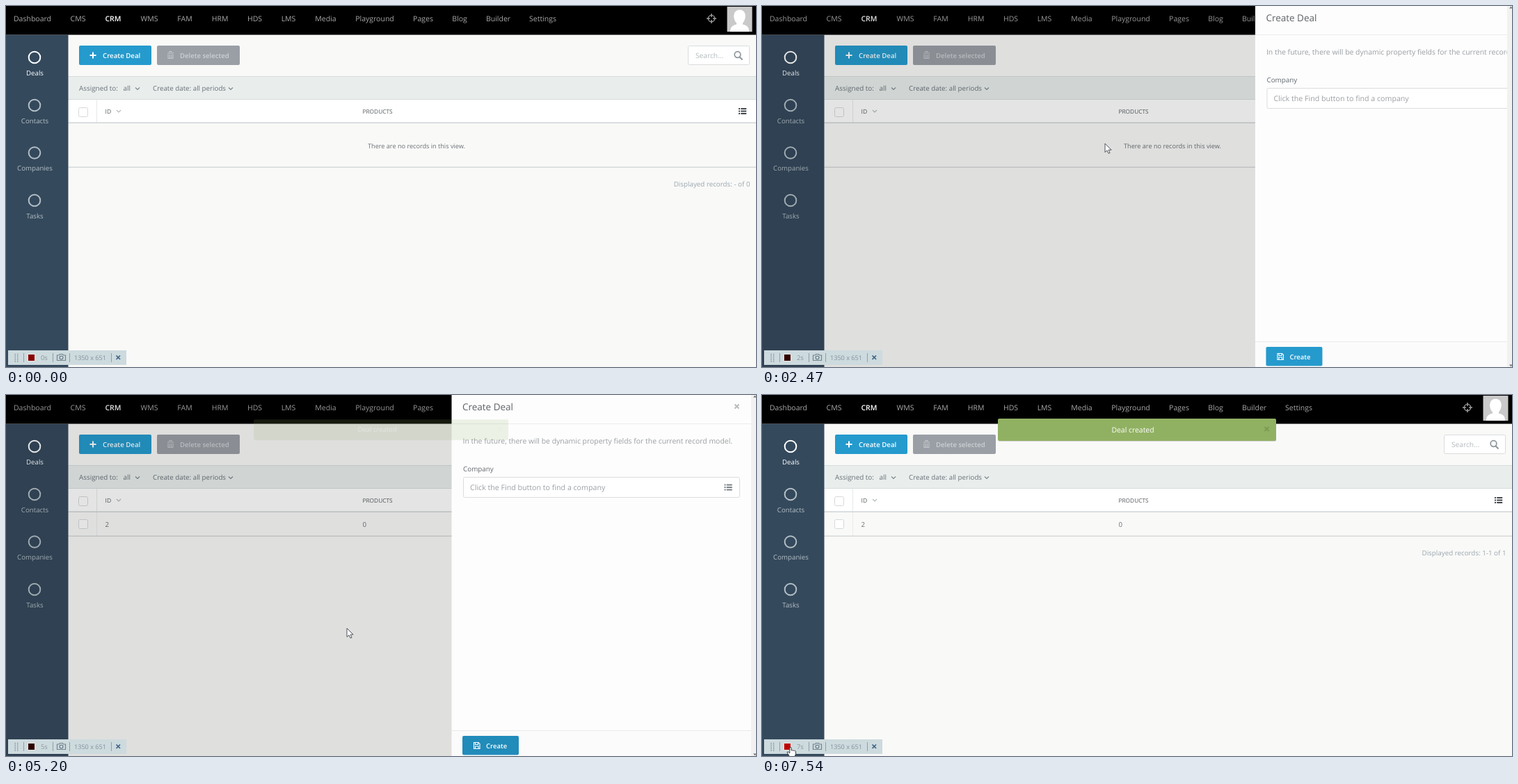
An HTML page for the animation above (7670 ms loop, 1078 px wide and 520 px high).

```html
<!DOCTYPE html>
<html lang="en">
<head>
<meta charset="utf-8">
<title>Create a deal</title>
<style>
  html, body { margin: 0; width: 100%; height: 100%; overflow: hidden; background: #f9f9f9; }
  svg { display: block; width: 1078px; height: 520px; text-rendering: geometricPrecision;
        font-family: "Open Sans", "Noto Sans", sans-serif; }
</style>
</head>
<body>
<svg id="stage" viewBox="0 0 1078 520"></svg>
<script>
const LOOP = 7670, STEP = 130, BLUE = '#259acd';

// ---- drawing helpers ----
const text = (x, y, str, size, fill, anchor = 'start', weight = 400, id = '') =>
  `<text x="${x}" y="${y}" font-size="${size}" fill="${fill}" text-anchor="${anchor}" font-weight="${weight}" id="${id}">${str}</text>`;
const rect = (x, y, w, h, fill, extra = '') =>
  `<rect x="${x}" y="${y}" width="${w}" height="${h}" fill="${fill}" ${extra}/>`;
const line = (d, color, width = 1) =>
  `<path d="${d}" fill="none" stroke="${color}" stroke-width="${width}"/>`;
const shape = (d, fill, extra = '') => `<path d="${d}" fill="${fill}" ${extra}/>`;
const ring = (x, y, r, color, width) =>
  `<circle cx="${x}" cy="${y}" r="${r}" fill="none" stroke="${color}" stroke-width="${width}"/>`;
const group = (id, body, extra = '') => `<g id="${id}" ${extra}>${body}</g>`;
const checkbox = y => rect(104.5, y, 13, 13, '#fff', 'rx="2" stroke="#d5d8da"');
const chevron = (x, y, color) => line(`M${x - 3} ${y - 1.5}l3 3 3-3`, color, 1.1);
const listIcon = (x, y, color) => [0, 3.5, 7].map(dy =>
  rect(x, y + dy, 2, 2, color) + rect(x + 3.2, y + dy, 8, 2, color)).join('');

// ---- page parts ----
function topBar() {
  const items = [['Dashboard', 38], ['CMS', 103.5], ['CRM', 154], ['WMS', 206], ['FAM', 257],
    ['HRM', 307.5], ['HDS', 357.5], ['LMS', 406], ['Media', 459.5], ['Playground', 530],
    ['Pages', 599.5], ['Blog', 652], ['Builder', 707.5], ['Settings', 771.5]];
  return rect(0, 0, 1078, 41.5, '#000') +
    items.map(([name, x]) => text(x, 21.7, name, 10.5, name === 'CRM' ? '#fff' : '#a9a9a9',
      'middle', name === 'CRM' ? 600 : 400)).join('') +
    ring(1014, 18, 4.7, '#a0a0a0', 1.3) +
    line('M1014 11v5M1014 20v5M1007 18h5M1016 18h5', '#a0a0a0', 1.5) +
    rect(1036.5, 1, 36, 36, '#c9c9c9') +
    shape('M1041 37c0-7 3-9 9-10.500v-2c-6-7-5-19 4.500-19s10.500 12 4.500 19v2c6 1.500 9 3.500 9 10.500z', '#fff');
}

function sideBar() {
  const items = [['Deals', 74], ['Contacts', 143], ['Companies', 211.5], ['Tasks', 280]];
  return rect(0, 41.5, 89.5, 478.5, '#34495c') + items.map(([name, y], i) => {
    const color = i ? '#b3bec6' : '#fff';
    return ring(41, y, 8.3, color, 2) + text(41.5, y + 25.8, name, 9.7, color, 'middle');
  }).join('');
}

function listView() {
  return rect(89.5, 41.5, 989, 479, '#f9f9f8') +
    rect(105, 57, 104, 28, BLUE, 'rx="2" id="createDeal"') +
    line('M120.500 71h9M125 66.500v9', '#fff', 2) +
    text(139, 74.8, 'Create Deal', 9.7, '#fff', 'start', 600) +
    rect(217, 57, 119, 28, '#9a9fa6', 'rx="2"') +
    line('M232 68h9M235 67v-1.500h3V67M233 69.500v6h7v-6M235.300 70v5M237.700 70v5', '#c3c7cb', 1.1) +
    text(250, 74.8, 'Delete selected', 9.55, '#cdd1d5', 'start', 600) +
    rect(980.5, 57.5, 88, 27, '#fff', 'rx="2" stroke="#d9dcdd"') +
    text(991, 75, 'Search...', 10.2, '#b4babd') +
    ring(1051.5, 70, 4.3, '#8d9599', 1.7) + line('M1054.500 73.500l4 4', '#8d9599', 2) +
    rect(89.5, 101, 989, 34, '#e9eeed') +
    line('M89.500 101.500H1078M89.500 134.500H1078', '#d5dcdc') +
    text(105, 122, 'Assigned to:', 9.9, '#697177') + text(168.5, 122, 'all', 9.9, '#697177') +
    chevron(189, 119, '#7b8388') +
    text(211, 122, 'Create date: all periods', 9.75, '#697177') + chevron(323, 119, '#7b8388') +
    rect(89.5, 135, 989, 33, '#fff') + line('M130.500 135V168', '#e6e8e8') +
    line('M89.500 168.300H1078', '#cfd4d5', 1.6) +
    checkbox(146.5) + text(142.5, 155.2, 'ID', 8.6, '#565c60') + chevron(162, 151.5, '#b3b8bb') +
    text(512.5, 155.2, 'PRODUCTS', 8.3, '#565c60') + listIcon(1053, 147, '#41474b') +
    group('emptyList',
      text(520, 204.5, 'There are no records in this view.', 9.15, '#6b7175') +
      line('M89.500 232.300H1078', '#d6d9da', 1.5) +
      text(1069.5, 259.7, 'Displayed records: - of 0', 9.8, '#9aa6ad', 'end')) +
    group('filledList',
      checkbox(179.5) + line('M130.500 169V203', '#e9ebeb') +
      text(142.5, 190.2, '2', 9.7, '#6b7175') + text(512.5, 190.2, '0', 9.7, '#6b7175') +
      line('M89.500 203.300H1078', '#d6d9da', 1.5) +
      text(1069.5, 231, 'Displayed records: 1-1 of 1', 9.8, '#9aa6ad', 'end'));
}

function dealPanel() {
  return rect(640.5, 0, 431, 520, '#fdfdfd') +
    line('M640.500 41.500H1071', '#ebebeb') +
    text(656, 22, 'Create Deal', 13.5, '#5d6266') +
    line('M1047.500 13.500l6 6M1053.500 13.500l-6 6', '#b9bcbe', 2) +
    text(656.5, 70.3, 'In the future, there will be dynamic property fields for the current record model.', 10.45, '#9a9fa3') +
    text(657, 110, 'Company', 9.85, '#63696e') +
    rect(657.5, 118.5, 397, 29, '#fff', 'rx="2" stroke="#d9dcde"') +
    text(667, 136.6, 'Click the Find button to find a company', 10.65, '#9b9fa3') +
    listIcon(1032.5, 128.5, '#7b8185') +
    rect(641, 483, 430, 37, '#fbfbfb') + line('M640.500 483.500H1071', '#e9e9e9') +
    rect(656, 491, 81, 27.5, BLUE, 'rx="2" id="submitDeal"') +
    line('M672.500 500.500h6.500l2 2v7h-8.500zM674.500 500.500v3h4v-3M674.500 509.500v-3.500h4.500v3.500', '#fff', 1.1) +
    text(690, 508.7, 'Create', 9.5, '#fff', 'start', 600);
}

function toastBox() {
  return rect(339.5, 35, 399.5, 32, '#000', 'rx="2" opacity=".16"') +
    rect(339, 34, 400, 32, '#91b162', 'rx="2"') +
    text(533, 53.5, 'Deal created', 10.45, '#fff', 'middle') +
    line('M722.500 46l6 6M728.500 46l-6 6', '#7c9b52', 2);
}

function recorder() {
  let dots = '';
  for (let i = 0; i < 10; i++) dots += rect(12.5 + i % 2 * 3.5, 501 + (i >> 1) * 2.6, 1.4, 1.4, '#7f8f98');
  return rect(3, 496, 170, 21, '#cddade') + dots +
    line('M25.500 500V513M67.500 500V513M91.500 500V513M151.500 500V513', '#8fa0a8') +
    rect(31.5, 501.5, 10, 10, '#800', 'stroke="#e4e4e2" id="light"') +
    text(50, 510.2, '', 9.4, '#8a989f', 'start', 400, 'seconds') +
    line('M73.500 503h3l1-1.500h4l1 1.500h3v7.500h-12z', '#738590', 1.2) + ring(79.5, 506.5, 2.4, '#738590', 1.4) +
    text(98, 510.2, '1350 x 651', 9.1, '#84939b') +
    line('M158.500 503.500l5.500 5.500M164 503.500l-5.500 5.500', '#3d6284', 1.7);
}

const cursors =
  group('arrow', shape('M0 0v12.500l3-2.700 2 4.400 2-.9-1.900-4.200h4z', '#fff', 'stroke="#3a4248" stroke-width=".9"')) +
  group('hand', shape('M-1.200 1v8l-1.800-1.800q-1.500-.8-1.900.6l3.600 6.200v2h7.300v-2.200l1.500-3.600v-4q-.8-1.400-2.100-.6-.9-1.200-2.100-.4-.8-1-2.200-.3V1q-1.100-1.600-2.300 0z',
    '#fff', 'stroke="#222b30" stroke-width=".9"')) +
  group('busy', ring(0, 0, 5.7, '#d5edf7', 5) + ring(0, 0, 5.7, '#65bfe6', 3.6) +
    '<circle r="3.400" fill="#ecf6fa"/>');

const stage = document.getElementById('stage');
stage.innerHTML = listView() + sideBar() + topBar() +
  rect(0, 0, 1078, 520, '#000', 'id="shade"') +
  group('panel', dealPanel()) +
  group('scrollbar', rect(1071, 0, 7, 520, '#f1f1f1') +
    shape('M1074 3.500l2.500-3 1.500 2v1z', '#777') + shape('M1074 516.500l2.500 3 1.500-2v-1z', '#777')) +
  group('toast', toastBox()) + recorder() + group('cursor', cursors);

// ---- motion ----
const el = id => document.getElementById(id);
const set = (id, name, value) => el(id).setAttribute(name, value);
const show = (id, on) => set(id, 'display', on ? 'inline' : 'none');
const ramp = (t, from, to) => Math.min(1, Math.max(0, (t - from) / (to - from)));
const ease = k => k * k * (3 - 2 * k);

// time, x, y, pointer from then on
const route = [
  [520, 41, 507, 'arrow'], [1040, 153, 76, 'hand'], [1430, 153, 76, 'busy'], [1820, 367, 157, 'busy'],
  [2210, 367, 157, 'arrow'], [2860, 725, 274, 'arrow'], [3120, 725, 274, 'arrow'],
  [3510, 698, 502, 'hand'], [4160, 698, 502, 'arrow'], [4940, 490, 336, 'arrow'],
  [6630, 490, 336, 'arrow'], [7280, 41, 507, 'hand'], [LOOP, 41, 507, 'hand']];

function moveCursor(t) {
  show('cursor', t >= route[0][0]);
  const i = route.findIndex(key => key[0] > t);
  if (i < 1) return;
  const [t0, x0, y0, kind] = route[i - 1], [t1, x1, y1] = route[i];
  const k = ease(ramp(t, t0, t1));
  set('cursor', 'transform', `translate(${x0 + (x1 - x0) * k} ${y0 + (y1 - y0) * k})`);
  for (const name of ['arrow', 'hand', 'busy']) show(name, name === kind);
}

function render(t) {
  set('createDeal', 'fill', t >= 1040 && t < 1560 ? '#196a90' : BLUE);
  set('submitDeal', 'fill', t >= 3510 && t < 4160 ? '#196a90' : t >= 4160 ? '#218bba' : BLUE);
  set('shade', 'opacity', 0.105 * (ramp(t, 1430, 1820) - ramp(t, 5460, 5980)));

  const opened = ease(ramp(t, 2080, 2600)) - ease(ramp(t, 5200, 5850));
  set('panel', 'transform', `translate(${438 * (1 - opened)} 0)`);
  show('scrollbar', t >= 2080 && t < 5980);

  const created = t >= 4940;
  show('emptyList', !created);
  show('filledList', created);

  const pop = ramp(t, 5135, 5570), scale = 0.9 + 0.1 * pop;
  set('toast', 'opacity', pop);
  set('toast', 'transform', `translate(539 50) scale(${scale}) translate(-539 -50)`);

  const glow = 128 + 105 * Math.cos((t / 680) * 2 * Math.PI - 1.52);
  set('light', 'fill', `rgb(${Math.round(glow)},0,0)`);
  el('seconds').textContent = Math.floor(t / 1000) + 's';
  moveCursor(t);
}

function tick(now) {
  const t = now % LOOP;
  render(t < 520 ? 0 : Math.floor(t / STEP) * STEP);
  requestAnimationFrame(tick);
}
tick(performance.now());
</script>
</body>
</html>
```
